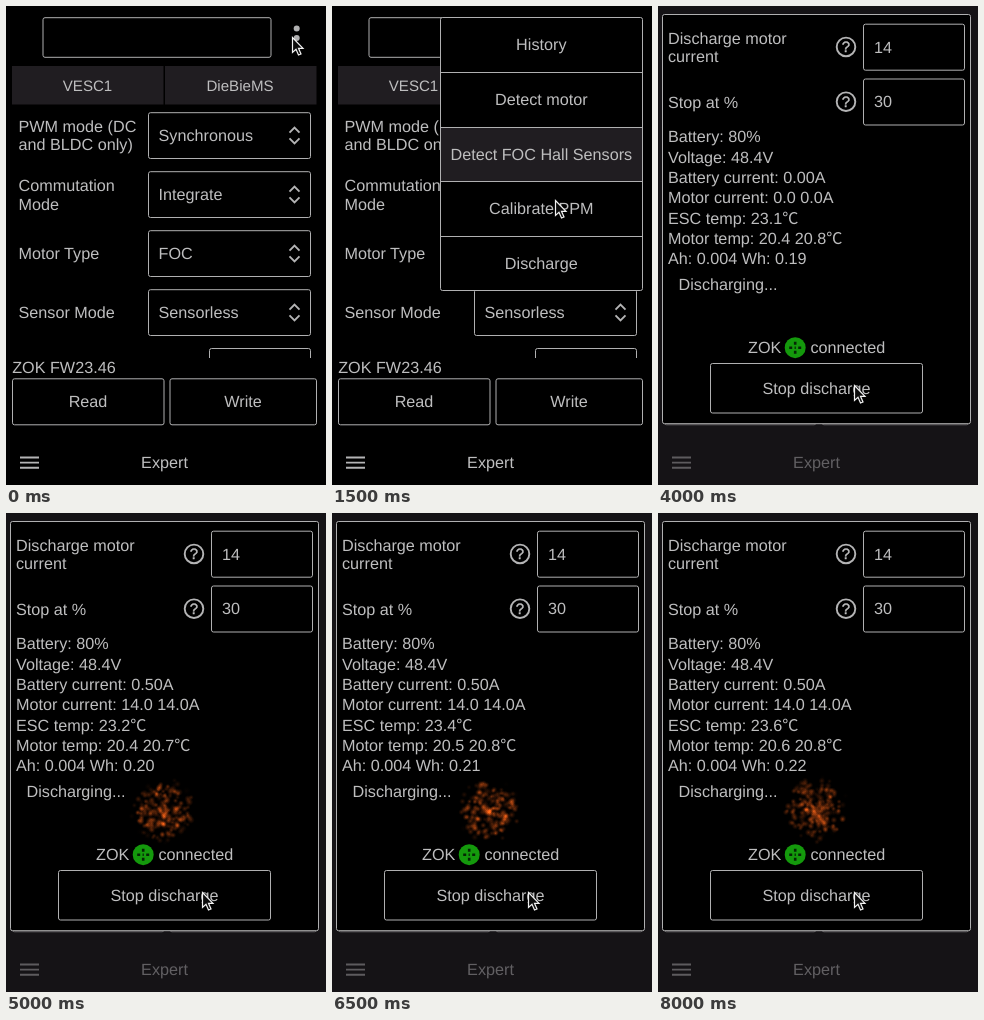
These frames come from a looping animation (320 px wide and 479 px high, 8.1 s). An HTML page with a canvas:

```html
<!DOCTYPE html>
<html lang="en">
<head>
<meta charset="utf-8">
<title>Discharge tool</title>
<style>
  html, body { margin: 0; width: 100%; height: 100%; overflow: hidden; background: #000; }
  svg, canvas { position: absolute; left: 0; top: 0; display: block; }
  text { font: 16.2px "Liberation Sans", Arial, "Noto Sans CJK SC", "Noto Sans CJK", sans-serif;
         fill: #bebebf; white-space: pre; text-rendering: geometricPrecision; }
  .mid { text-anchor: middle; }
  .tab { font-size: 15.1px; }
  .help { font-size: 15px; stroke: #bebebf; stroke-width: .4; }
  .box { fill: #000; stroke: #b0b0b1; }
  .line { fill: none; stroke: #b4b4b5; stroke-width: 1.9; }
  .hot { fill: #201d21; }
</style>
</head>
<body>
<svg id="stage" width="320" height="479" viewBox="0 0 320 479"></svg>
<canvas id="sparks" width="320" height="479"></canvas>
<script>
const LOOP = 8100, STEP = 100;
const $ = id => document.getElementById(id);

const text = (x, y, s, cls = '', id = '') => `<text x="${x}" y="${y}" class="${cls}" id="${id}">${s}</text>`;
const box = (x, y, w, h, id = '') =>
  `<rect x="${x}" y="${y}" width="${w}" height="${h}" rx="2" class="box" id="${id}"/>`;
const hot = (x, y, w, h, id = '') =>
  `<rect x="${x}" y="${y}" width="${w}" height="${h}" class="hot" id="${id}"/>`;
const line = d => `<path d="${d}" class="line"/>`;

const combo = (i, value) => {
  const y = 106.7 + 59 * i;
  return box(142.5, y, 162, 45.8) + text(152.5, y + 28.6, value) +
    line(`M283.5 ${y + 20}l5-5 5 5M283.5 ${y + 25.6}l5 5 5-5`);
};

const field = (y, value) =>
  `<circle cx="188" cy="${y + 22.7}" r="9.3" class="line"/>` +
  text(188, y + 28, '?', 'mid help') +
  box(205.5, y, 101, 46) + text(216, y + 28.4, value);

const mainScreen = () =>
  box(37, 11.7, 228, 39.6) +
  hot(267, 9, 47, 48, 'dotsHot') +
  [22.5, 32, 41.5].map(y => `<circle cx="290.700" cy="${y}" r="3" fill="#b0b0b1"/>`).join('') +
  hot(6, 60, 151.5, 38.5) + hot(159, 60, 151.5, 38.5) +
  text(81.5, 84.5, 'VESC1', 'mid tab') + text(234, 84.5, 'DieBieMS', 'mid tab') +
  text(12.5, 125.8, 'PWM mode (DC') + text(12.5, 144.3, 'and BLDC only)') +
  text(12.5, 185.3, 'Commutation') + text(12.5, 203.5, 'Mode') +
  text(12.5, 253, 'Motor Type') + text(12.5, 312, 'Sensor Mode') +
  ['Synchronous', 'Integrate', 'FOC', 'Sensorless'].map((v, i) => combo(i, v)).join('') +
  '<path d="M203.5 352v-7.500q0-2 2-2h97q2 0 2 2v7.500" fill="none" stroke="#b0b0b1"/>' +
  text(6.2, 367.4, 'ZOK FW23.46') +
  box(6.5, 372.8, 151.5, 46) + text(82, 401.2, 'Read', 'mid') +
  box(164, 372.8, 146.5, 46) + text(237, 401.2, 'Write', 'mid') +
  line('M14 451.500h19M14 456.600h19M14 461.700h19') + text(158.5, 462.2, 'Expert', 'mid');

const menuItems = ['History', 'Detect motor', 'Detect FOC Hall Sensors', 'Calibrate PPM', 'Discharge'];
const ROW = 54.6;
const menu = () =>
  box(108.5, 11.5, 202, 273) +
  hot(109, 12, 201, ROW - 0.5, 'menuHot') +
  menuItems.map((s, i) =>
    (i ? `<path d="M108.5 ${Math.round(11.5 + ROW * i) + 0.5}h202" stroke="#b0b0b1"/>` : '') +
    text(209.3, 44.3 + ROW * i, s, 'mid')).join('');

const rowY = [136.3, 156.8, 176.7, 196.9, 218.1, 238.3, 257.8];
const dialog = () =>
  '<rect width="320" height="479" fill="#242026" opacity=".6"/>' +
  box(4.5, 8.5, 308, 409.2) +
  text(10, 37.9, 'Discharge motor') + text(10, 55.9, 'current') + text(10, 101.8, 'Stop at %') +
  field(18.2, '14') + field(73, '30') +
  rowY.map((y, i) => text(10, y, '', '', 'row' + i)).join('') +
  text(20.5, 284.2, 'Discharging...', '', 'busy') +
  text(90, 347.2, 'ZOK') + text(152.5, 347.2, 'connected') +
  '<circle cx="137.200" cy="341.700" r="10.500" fill="#14990c"/>' +
  '<g transform="translate(137.200 341.700)" stroke="#052605">' +
  '<path id="linkOn" d="M0-5.500V5.500M-5.500 0H5.500" stroke-width="2.400"/>' +
  '<path id="linkIdle" d="M0-6v3M0 3v3M-6 0h3M3 0h3M-.6 0h1.200" stroke-width="2.600"/></g>' +
  box(52.5, 357.5, 212, 49.5, 'startBtn') + text(158.5, 388.2, '', 'mid', 'startText');

$('stage').innerHTML = mainScreen() +
  `<g id="menu">${menu()}</g><g id="dialog">${dialog()}</g>` +
  '<path id="cursor" d="M.5 .5V15.500L4 12.300 6.500 18 9 17 6.500 11.300H11Z" fill="#0c0c0c" stroke="#f2f2f2" stroke-width="1.200"/>';

// Step tables: [start time, value...]
const cursorPath = [[0, 286, 31], [100, 286, 31], [300, 290, 31], [1200, 290, 31], [1300, 275, 62],
  [1400, 247, 130], [1500, 223, 194], [1600, 213, 226], [1700, 206, 250], [1900, 202, 263],
  [2400, 202, 263], [3000, 207, 305], [3400, 196, 379]];
const hover = [[0, -1], [1300, 0], [1400, 1], [1500, 2], [1600, 3], [1700, 4]];
const fade = [[0, 0], [2200, .35], [2300, .7], [2400, 1]];
const batteryA = [[0, '0.00'], [4300, '0.21'], [4400, '0.43'], [4500, '0.50']];
const motorA = [[0, '0.0 0.0'], [4200, '3.8 3.8'], [4300, '8.6 8.6'], [4400, '13.2 13.2'], [4500, '14.0 14.0']];
const escTemp = [[0, '23.1'], [4700, '23.2'], [5500, '23.3'], [6300, '23.4'], [7100, '23.5'], [7800, '23.6']];
const motorTemp = [[0, '20.4 20.8'], [4800, '20.4 20.7'], [5400, '20.5 20.7'], [6200, '20.5 20.8'], [7400, '20.6 20.8']];
const energy = [[0, '0.19'], [4900, '0.20'], [6300, '0.21'], [7600, '0.22']];

const at = (table, t) => table.filter(row => row[0] <= t).pop()[1];

function along(path, t) {
  const i = path.findIndex(p => p[0] > t);
  if (i < 0) return path[path.length - 1].slice(1);
  const a = path[i - 1], b = path[i], k = (t - a[0]) / (b[0] - a[0]);
  return [a[1] + (b[1] - a[1]) * k, a[2] + (b[2] - a[2]) * k];
}

const show = (id, on) => $(id).setAttribute('visibility', on ? 'inherit' : 'hidden');
const within = (t, from, to) => t >= from && t < to;

const ctx = $('sparks').getContext('2d');
const rand = n => { const v = Math.sin(n * 127.1 + 11.7) * 43758.5453; return v - Math.floor(v); };

function drawSparks(t) {
  const LIFE = 800, START = 4100;
  ctx.clearRect(0, 0, 320, 479);
  ctx.globalCompositeOperation = 'lighter';
  for (let i = 0; i < 230; i++) {
    const clock = t - START - rand(i) * LIFE;
    if (clock < 0) continue;
    const age = clock / LIFE % 1, seed = i * 7 + Math.floor(clock / LIFE) * 1301;
    const angle = rand(seed + 1) * 2 * Math.PI;
    const reach = 34 * rand(seed + 2) ** 0.65 * (0.6 + 0.4 * age);
    const x = 157.5 + reach * Math.cos(angle), y = 297 + reach * Math.sin(angle);
    const r = 2.4 + 1.6 * rand(seed + 3);
    const glow = ctx.createRadialGradient(x, y, 0, x, y, r);
    glow.addColorStop(0, `rgba(150,62,16,${0.55 * Math.sin(Math.PI * age)})`);
    glow.addColorStop(1, 'rgba(110,40,8,0)');
    ctx.fillStyle = glow;
    ctx.fillRect(x - r, y - r, 2 * r, 2 * r);
  }
}

function render(t) {
  const [x, y] = along(cursorPath, t), item = at(hover, t), running = t >= 3900;
  $('cursor').setAttribute('transform', `translate(${Math.round(x)} ${Math.round(y)})`);
  show('dotsHot', within(t, 500, 700));
  show('menu', within(t, 700, 2200));
  show('menuHot', item >= 0);
  $('menuHot').setAttribute('y', 12 + ROW * Math.max(item, 0));
  $('dialog').setAttribute('opacity', at(fade, t));
  [
    'Battery: 80%', 'Voltage: 48.4V',
    `Battery current: ${at(batteryA, t)}A`,
    `Motor current: ${at(motorA, t)}A`,
    `ESC temp: ${at(escTemp, t)}℃`,
    `Motor temp: ${at(motorTemp, t)}℃`,
    `Ah: 0.004 Wh: ${at(energy, t)}`
  ].forEach((s, i) => { $('row' + i).textContent = s; });
  show('busy', running);
  $('startText').textContent = (running ? 'Stop' : 'Start') + ' discharge';
  $('startBtn').style.fill = within(t, 3700, 3900) ? '#201d21' : '#000';
  const linkOn = within(t % 1300, 600, 800);
  show('linkOn', linkOn);
  show('linkIdle', !linkOn);
  drawSparks(t);
}

let last = -1;
const origin = performance.now();
function tick() {
  const t = Math.floor((performance.now() - origin) % LOOP / STEP) * STEP;
  if (t !== last) render(last = t);
  requestAnimationFrame(tick);
}
tick();
</script>
</body>
</html>
```
